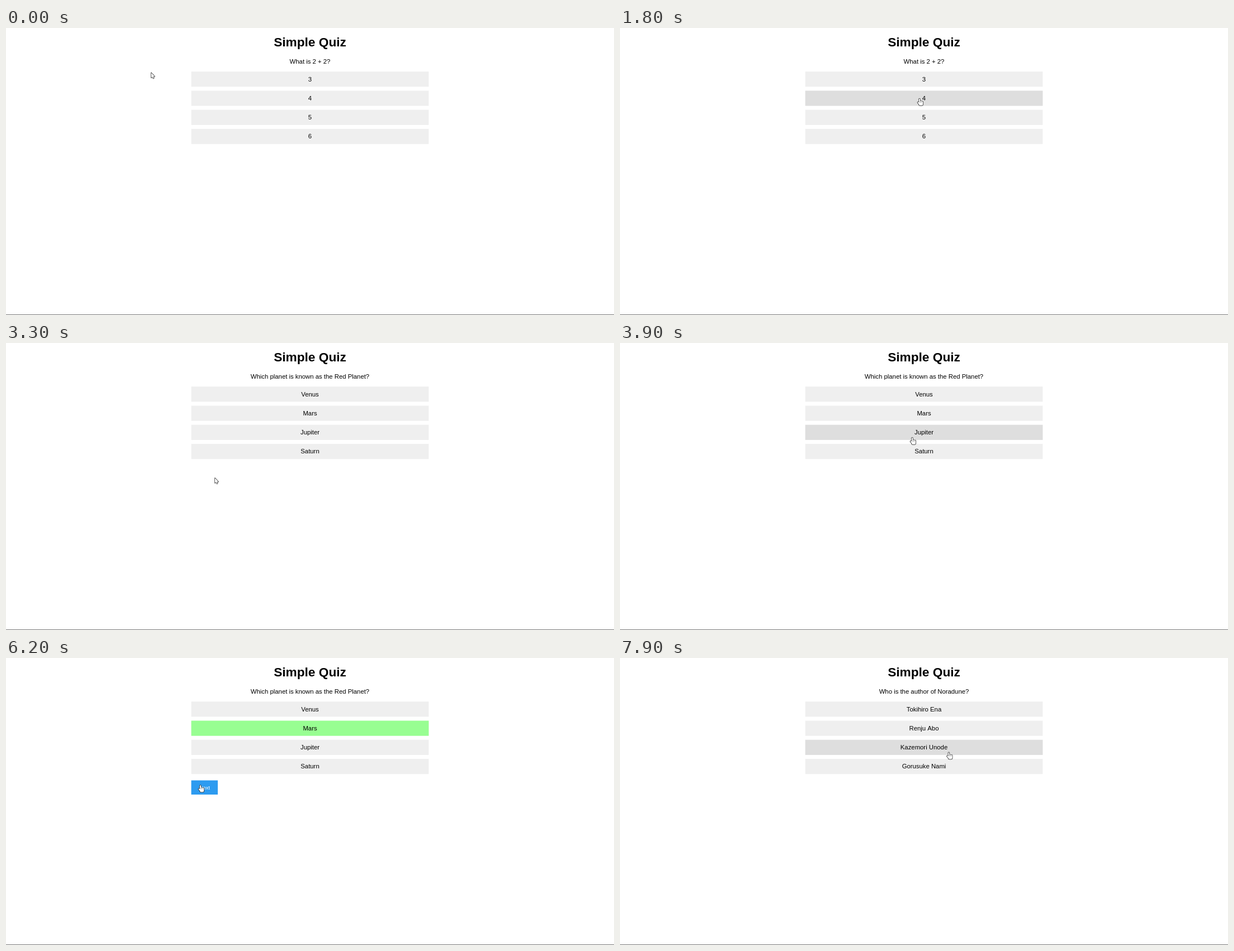
These frames come from a looping animation (1088 by 515 pixels, 8 s). An HTML page with a canvas:

```html
<!DOCTYPE html>
<html lang="en">
<head>
<meta charset="utf-8">
<title>Simple Quiz</title>
<style>
  html, body { margin: 0; width: 100%; height: 100%; overflow: hidden; background: #fff; }
  canvas { display: block; width: 1088px; height: 515px; }
</style>
</head>
<body>
<canvas id="stage" width="1088" height="515"></canvas>
<script>
const ctx = document.getElementById('stage').getContext('2d');
const LOOP = 8000, STEP = 100;
const FONT = '"Liberation Sans", Arial, sans-serif';

// The page is laid out 1536 units wide and shown scaled to the stage.
const SCALE = 1088 / 1536;
const CENTER = 768, WIDTH = 600, LEFT = CENTER - WIDTH / 2;
const TOP = 110.4, ROW = 38.4, GAP = 10;
const NEXT = { x: LEFT, y: 310, w: 67, h: 36 };

// Each question stays until the next one; row 1 is clicked at `answered`.
const quiz = [
  { start: 0, answered: 2000, text: 'What is 2 + 2?', options: ['3', '4', '5', '6'] },
  { start: 3200, answered: 5300, text: 'Which planet is known as the Red Planet?',
    options: ['Venus', 'Mars', 'Jupiter', 'Saturn'] },
  { start: 6400, answered: Infinity, text: 'Who is the author of Noradune?',
    options: ['Tokihiro Ena', 'Renju Abo', 'Kazemori Unode', 'Gorusuke Nami'] }
];

// Pointer stops on the stage; without `leave` it passes straight through.
const stops = [
  { x: 259.5, y: 79.5, at: 0 },
  { x: 545, y: 57, at: 600 },
  { x: 560, y: 179, at: 1200 },
  { x: 536, y: 126.5, at: 1800, leave: 2100 },
  { x: 373.5, y: 241.5, at: 2900, leave: 3300 },
  { x: 523, y: 169.5, at: 3900 },
  { x: 530, y: 24, at: 4200 },
  { x: 522, y: 150, at: 4500 },
  { x: 517.5, y: 113.3, at: 5200, leave: 5500 },
  { x: 348, y: 228, at: 6200, leave: 6700 },
  { x: 540, y: 68, at: 7400 },
  { x: 588.5, y: 169, at: 7900 }
];

const arrow = new Path2D('M.4 .8V9.8L2.4 8L3.9 11.2L5.2 10.6L3.9 7.5H6.6Z');
const hand = new Path2D();
const knuckles = new Path2D();
for (let i = 0; i < 4; i++) {
  const x = -1.1 + 1.75 * i, top = i ? 3.7 + 0.45 * i : 0.2;
  hand.roundRect(x, top, 2, 11 - top, 1);
  if (i) {
    knuckles.moveTo(x, top + 1);
    knuckles.lineTo(x, 7.2);
  }
}
hand.roundRect(-1.1, 6.5, 7.2, 6, 2);
const thumb = new Path2D();
thumb.ellipse(-1.6, 8.2, 2.5, 1.1, 0.8, 0, 2 * Math.PI);
hand.addPath(thumb);

const inside = (p, r) => p.x >= r.x && p.x < r.x + r.w && p.y >= r.y && p.y < r.y + r.h;

function pointerAt(t) {
  const next = stops.findIndex(s => s.at > t);
  if (next < 0) return stops[stops.length - 1];
  const a = stops[next - 1], b = stops[next];
  const from = a.leave || a.at;
  const u = Math.max(0, (t - from) / (b.at - from));
  const e = u * u * (3 - 2 * u);
  return { x: a.x + (b.x - a.x) * e, y: a.y + (b.y - a.y) * e };
}

function box(r, color) {
  ctx.fillStyle = color;
  ctx.fillRect(r.x, r.y, r.w, r.h);
}

function label(text, x, y, size, color = '#000', weight = '') {
  ctx.font = `${weight} ${size}px ${FONT}`;
  ctx.fillStyle = color;
  ctx.fillText(text, x, y);
}

function drawPointer(p, overLink) {
  const shape = overLink ? hand : arrow;
  ctx.save();
  ctx.translate(p.x, p.y);
  ctx.lineJoin = 'round';
  ctx.strokeStyle = '#222';
  ctx.fillStyle = '#fff';
  ctx.lineWidth = 1.4;
  ctx.stroke(shape);
  ctx.fill(shape);
  if (overLink) {
    ctx.lineWidth = 0.5;
    ctx.stroke(knuckles);
  }
  ctx.restore();
}

function draw(t) {
  const q = quiz.filter(item => item.start <= t).pop();
  const done = t >= q.answered;
  const pointer = pointerAt(t);
  const p = { x: pointer.x / SCALE, y: pointer.y / SCALE };
  let overLink = false;

  box({ x: 0, y: 0, w: 1088, h: 515 }, '#fff');
  box({ x: 0, y: 514, w: 1088, h: 1 }, '#777');

  ctx.save();
  ctx.scale(SCALE, SCALE);
  ctx.textAlign = 'center';
  label('Simple Quiz', CENTER, 47.2, 32, '#000', 'bold');
  label(q.text, CENTER, 90.6, 16);

  q.options.forEach((option, i) => {
    const row = { x: LEFT, y: TOP + (ROW + GAP) * i, w: WIDTH, h: ROW };
    const hover = inside(p, row);
    overLink = overLink || hover;
    const color = done && i === 1 ? '#98fe92' : hover && !done ? '#dedede' : '#efefef';
    box(row, color);
    label(option, CENTER, row.y + 24.5, 16);
  });

  if (done) {
    box(NEXT, '#2d9bf0');
    label('Next', NEXT.x + NEXT.w / 2, NEXT.y + 22.6, 13.33, '#fff');
    overLink = overLink || inside(p, NEXT);
  }
  ctx.restore();
  drawPointer(pointer, overLink);
}

const began = performance.now();
function tick() {
  const t = (performance.now() - began) % LOOP;
  draw(Math.floor(t / STEP) * STEP);
  requestAnimationFrame(tick);
}
tick();
</script>
</body>
</html>
```
